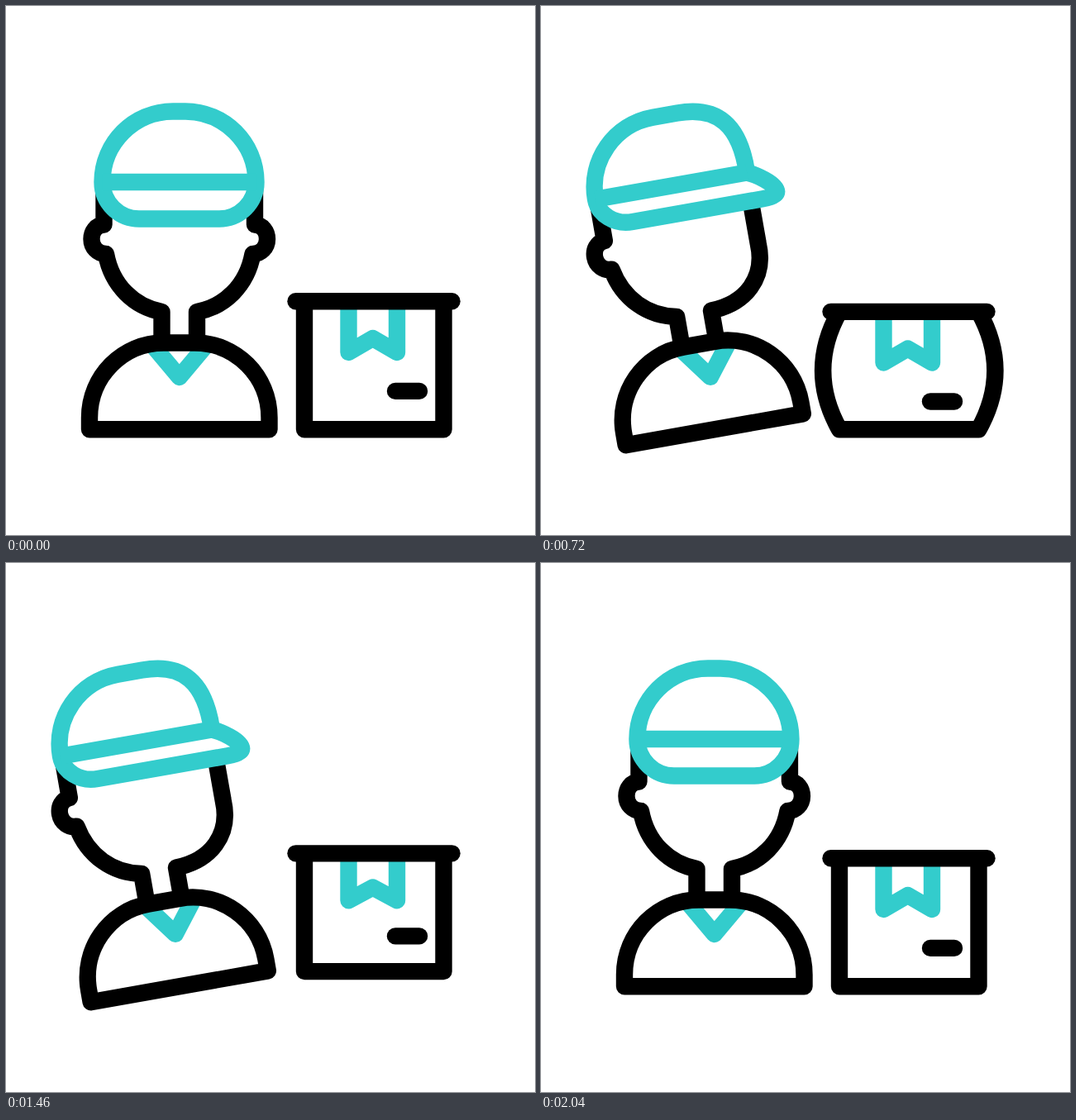
An HTML page that plays this animation: 640 px wide and 640 px high, repeating every 2400 ms.

```html
<!DOCTYPE html>
<html lang="en">
<head>
<meta charset="utf-8">
<title>Courier and parcel</title>
<style>
  html, body { margin: 0; width: 100%; height: 100%; overflow: hidden; background: #fff; }
  svg { display: block; width: 100%; height: 100%; }
  path { fill: none; stroke: #000; stroke-width: 20.4; stroke-linejoin: round; }
  .teal { stroke: #33cccc; }
  .round { stroke-linecap: round; }
  #cap { fill: #fff; }
</style>
</head>
<body>
<svg viewBox="0 0 640 640">
  <g id="person">
    <path id="collar" class="teal"/>
    <path d="M101 512.3V498C101 448 141 407.5 191 407.5H228.5C278.5 407.5 318.5 448 318.5 498V512.3Z"/>
    <path d="M118.5 222V264.5C109 265 103.5 273 103.5 282C103.5 292 111 300 121 300C128 338 155 364 188.5 370V407"/>
    <path id="face"/>
    <path id="cap" class="teal"/>
    <path class="teal" d="M116.5 213H302.5"/>
  </g>
  <g>
    <path id="tape" class="teal"/>
    <path id="sides"/>
    <path id="lid" class="round"/>
    <path id="slot" class="round"/>
  </g>
</svg>
<script>
const LOOP = 2400, STEP = 20;
const $ = id => document.getElementById(id);
const lerp = (a, b, p) => a + (b - a) * p;

// Front view and turned view of the parts that change shape.
const shapes = {
  collar: [
    'M177 410L209.75 449L242.5 410',
    'M187 410L216 449L246 410'
  ],
  face: [
    'M301 222L301 264.5C310.5 265 316 273 316 282C316 292 308.5 300 298.5 300C291.5 338 264.5 364 231 370L231 407',
    'M301 222L301 264.5C301 270 301 276 301 282C301 288 301 294 301 300C303 342 274 369 231 370L231 407'
  ],
  cap: [
    'M116.5 213C116.5 165.8 154.8 127.5 202 127.5L217 127.5C264.2 127.5 302.5 165.8 302.5 213C302.5 225.3 297.6 236.4 289.5 244.5C281.4 252.6 270.3 257.5 258 257.5L161 257.5C136.4 257.5 116.5 237.6 116.5 213Z',
    'M116.5 213C116.5 165.8 154.8 127.5 202 127.5L232 127.5C282 127.5 304 155 302.5 213C312 217 335 232 334 242C333.5 246 326 247.7 316 247.7L156 247.7C134 247.7 116.5 232 116.5 213Z'
  ]
};

function morph([from, to], p) {
  const ends = to.match(/[\d.]+/g);
  let i = 0;
  return from.replace(/[\d.]+/g, n => lerp(+n, +ends[i++], p).toFixed(2));
}

// Tracks are [time, value] pairs, eased in and out between neighbours.
const tracks = {
  turn: [[200, 0], [700, 1], [1560, 1], [2050, 0]],
  lid: [[400, 0], [800, 14], [1200, -64.5], [1600, 17], [2000, 0]],
  base: [[800, 0], [1200, -64.5], [1600, 0]],
  bulge: [[400, 0], [800, 22.2], [1200, 0]]
};

function at(track, t) {
  if (t <= track[0][0]) return track[0][1];
  for (let i = 1; i < track.length; i++) {
    const [t0, a] = track[i - 1], [t1, b] = track[i];
    if (t < t1) {
      const u = (t - t0) / (t1 - t0);
      return lerp(a, b, u * u * (3 - 2 * u));
    }
  }
  return track[track.length - 1][1];
}

function drawPerson(t) {
  const p = at(tracks.turn, t);
  $('person').setAttribute('transform', `rotate(${-10 * p} 209.75 512.3)`);
  for (const id in shapes) $(id).setAttribute('d', morph(shapes[id], p));
}

function drawBox(t) {
  const top = 357.3 + at(tracks.lid, t);
  const base = 512.3 + at(tracks.base, t);
  const bend = 2 * at(tracks.bulge, t);
  const mid = (top + base) / 2;
  // Contents hang from the lid on the way up and compress on landing.
  const k = t < 1200 ? 1 : (base - top) / 155;
  const y = d => top + d * k;
  $('sides').setAttribute('d',
    `M361 ${top}Q${361 - bend} ${mid} 361 ${base}H529.5Q${529.5 + bend} ${mid} 529.5 ${top}`);
  $('lid').setAttribute('d', `M350.5 ${top}H539.5`);
  $('tape').setAttribute('d',
    `M414.5 ${top}V${y(61.7)}L443.75 ${y(44.7)}L473 ${y(61.7)}V${top}`);
  $('slot').setAttribute('d', `M471 ${y(108.6)}H500`);
}

function draw(now) {
  const t = Math.floor((now % LOOP) / STEP) * STEP;
  drawPerson(t);
  drawBox(t);
}

const start = performance.now();
function tick() {
  draw(performance.now() - start);
  requestAnimationFrame(tick);
}
tick();
</script>
</body>
</html>
```
